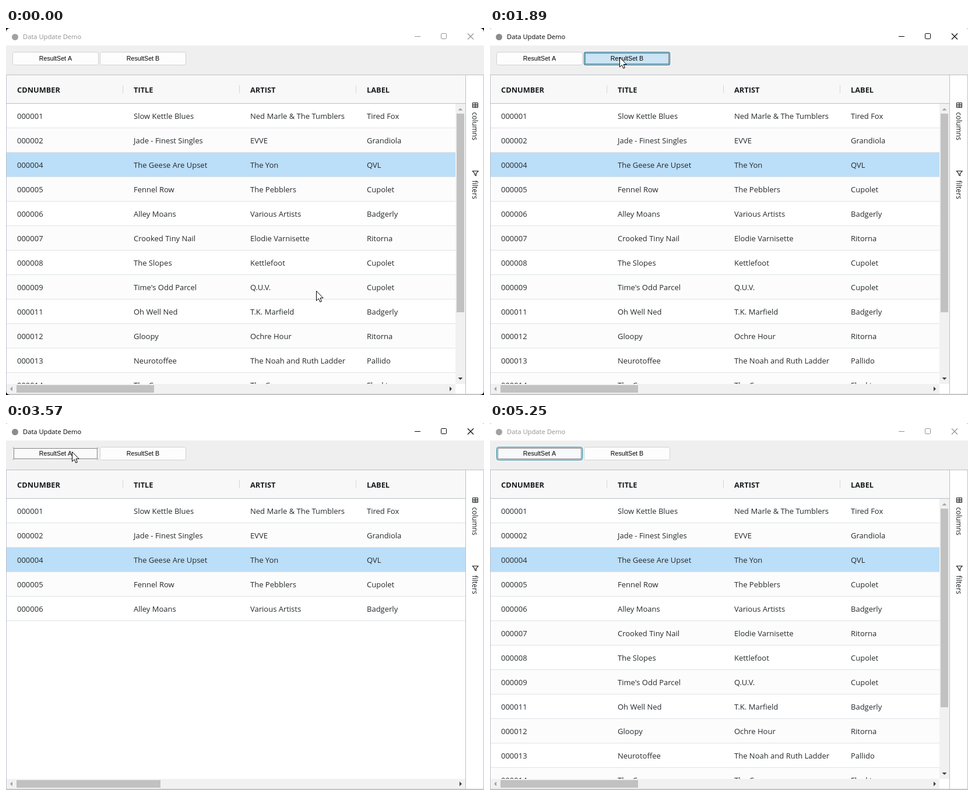
Write an HTML page with a canvas that moves like this. It is 820x630 px and loops after 5.33 s.

```html
<!DOCTYPE html>
<html lang="en">
<head>
<meta charset="utf-8">
<title>Data Update Demo</title>
<style>
  html, body { margin: 0; width: 100%; height: 100%; overflow: hidden; background: #fff; }
  canvas { display: block; }
</style>
</head>
<body>
<canvas id="stage" width="820" height="630"></canvas>
<script>
const ctx = document.getElementById('stage').getContext('2d');
const LOOP = 5330;
const UI = '"Open Sans", "Noto Sans", sans-serif';
const TEAL = '#0b7390', LINE = '#babfc7', INK = '#25292b';

const COLUMNS = ['CDNUMBER', 'TITLE', 'ARTIST', 'LABEL'];
const ROWS = [
  ['000001', 'Slow Kettle Blues', 'Ned Marle & The Tumblers', 'Tired Fox'],
  ['000002', 'Jade - Finest Singles', 'EVVE', 'Grandiola'],
  ['000004', 'The Geese Are Upset', 'The Yon', 'QVL'],
  ['000005', 'Fennel Row', 'The Pebblers', 'Cupolet'],
  ['000006', 'Alley Moans', 'Various Artists', 'Badgerly'],
  ['000007', 'Crooked Tiny Nail', 'Elodie Varnisette', 'Ritorna'],
  ['000008', 'The Slopes', 'Kettlefoot', 'Cupolet'],
  ['000009', "Time's Odd Parcel", 'Q.U.V.', 'Cupolet'],
  ['000011', 'Oh Well Ned', 'T.K. Marfield', 'Badgerly'],
  ['000012', 'Gloopy', 'Ochre Hour', 'Ritorna'],
  ['000013', 'Neurotoffee', 'The Noah and Ruth Ladder', 'Pallido'],
  ['000014', 'The Coves', 'The Coves', 'Flanktor']
];

const ARROW = new Path2D('M0 0v16.6l3.8-3.6 2.5 5.8 2.6-1.1-2.4-5.7h5.1z');
const HAND = new Path2D('M6 13V2.2a1.7 1.7 0 0 1 3.4 0V9q1.5-1.2 3 .3 1.5-.9 2.7.6 2-.3 2 1.8v5q0 3-2 5.5v1h-8v-1q-2.5-2.5-4.5-6.5-2-2.5-.8-3.2 1.8-.8 4.2 2.2z');

const ramp = (t, a, b) => Math.min(1, Math.max(0, (t - a) / (b - a)));
const within = (t, a, b) => t >= a && t < b;

function rect(x, y, w, h, color) {
  ctx.fillStyle = color;
  ctx.fillRect(x, y, w, h);
}

function text(str, x, y, font, color = INK, align = 'left') {
  ctx.font = font;
  ctx.fillStyle = color;
  ctx.textAlign = align;
  ctx.fillText(str, x, y);
}

function stroke(d, color, width = 1) {
  ctx.strokeStyle = color;
  ctx.lineWidth = width;
  ctx.stroke(new Path2D(d));
}

function fill(d, color) {
  ctx.fillStyle = color;
  ctx.fill(new Path2D(d));
}

function titleBar(active) {
  const color = active ? '#000' : '#929292';
  rect(0, 0, 820, 30, '#fff');
  ctx.beginPath();
  ctx.arc(15.5, 15.5, 5.5, 0, 7);
  ctx.fillStyle = active ? '#8c8c8c' : '#a2a2a2';
  ctx.fill();
  text('Data Update Demo', 29, 19, '11.2px ' + UI, color);
  stroke('M701 14.5h10M747.5 9.5h7q1 0 1 1v7q0 1-1 1h-7q-1 0-1-1v-7q0-1 1-1z', color);
  stroke('M792 9.5l10 10M802 9.5l-10 10', color, 1.1);
}

function button(x, label, { hot = 0, press = 0, blank = 0, focus = false }) {
  const layer = (inside, border, alpha) => {
    ctx.globalAlpha = alpha;
    ctx.beginPath();
    ctx.roundRect(x + .5, 41.5, 147, 22, 3);
    ctx.fillStyle = inside;
    ctx.fill();
    ctx.strokeStyle = border;
    ctx.lineWidth = 1;
    ctx.stroke();
    ctx.globalAlpha = 1;
  };
  layer(focus ? '#f6fafc' : '#fdfdfd', focus ? TEAL : '#d0d0d0', 1);
  layer('#dcecf8', TEAL, hot);
  layer('#cce4f4', '#0b6580', press);
  layer('#fafafa', '#efefef', blank);
  if (focus) {
    ctx.setLineDash([1, 1]);
    ctx.strokeStyle = '#000';
    ctx.strokeRect(x + 2.5, 43.5, 143, 18);
    ctx.setLineDash([]);
  }
  text(label, x + 74, 56, '10.67px "Liberation Sans", Arial, sans-serif', '#000', 'center');
}

function toolbar(t) {
  rect(0, 30, 820, 50, '#efefef');
  button(11, 'ResultSet A', {
    hot: t < 2950 ? 0 : ramp(t, 2950, 3200) * (1 - ramp(t, 4640, 4850)),
    press: within(t, 3330, 3570) ? ramp(t, 3300, 3400) : 0,
    blank: t < 3570 ? 0 : 1 - ramp(t, 3580, 3800),
    focus: t >= 3330
  });
  button(161, 'ResultSet B', {
    hot: t < 1260 ? 0 : ramp(t, 1050, 1400) * (1 - ramp(t, 2850, 3100)),
    press: within(t, 1820, 2050) ? ramp(t, 1790, 1890) : 0,
    blank: t < 2050 ? 0 : 1 - ramp(t, 2050, 2280),
    focus: within(t, 1820, 3330)
  });
}

function grid(t) {
  const short = within(t, 2110, 3640);
  const right = short ? 788 : 771;
  rect(0, 80, 820, 550, '#fff');
  rect(1, 81, 787, 48, '#f8f8f8');
  COLUMNS.forEach((name, i) => {
    text(name, 19 + 200 * i, 111, 'bold 12.8px ' + UI, '#181d1f');
    if (i) rect(200 * i, 98, 1, 14, '#d3d6da');
  });

  ctx.save();
  ctx.beginPath();
  ctx.rect(1, 130, right - 1, 481);
  ctx.clip();
  ROWS.slice(0, short ? 5 : 12).forEach((row, i) => {
    const y = 130 + 42 * i;
    const hover = i === 6 && within(t, 590, 1260);
    rect(1, y, 787, 42, i === 2 ? '#bbdef9' : hover ? '#e8f4fd' : i % 2 ? '#fcfcfc' : '#fff');
    rect(1, y + 41, 787, 1, '#dfe2e6');
    row.forEach((cell, c) => text(cell, 19 + 200 * c, y + 26, '13px ' + UI));
  });
  if (within(t, 590, 1820)) {
    ctx.strokeStyle = '#2196d3';
    ctx.lineWidth = 1;
    ctx.strokeRect(201.5, 214.5, 199, 40);
  }
  ctx.restore();

  if (!short) {
    rect(771, 130, 17, 481, '#f1f1f1');
    rect(773, 147, 13, 341, '#c1c1c1');
    fill('M775.5 141.5h8l-4-4z', '#a3a3a3');
    fill('M775.5 600h8l-4 4z', '#404040');
  }
  rect(1, 611, right - 1, 17, '#f1f1f1');
  rect(18, 613, short ? 247 : 236, 13, '#c1c1c1');
  fill('M11 615.5v8l-4-4z', '#a3a3a3');
  fill(`M${right - 10} 615.5v8l4-4z`, '#404040');

  rect(0, 80, 820, 1, LINE);
  rect(1, 129, 788, 1, LINE);
  rect(0, 80, 1, 550, LINE);
  rect(788, 80, 1, 549, LINE);
  rect(819, 80, 1, 550, LINE);
  rect(0, 628, 820, 2, '#c2c4c7');
}

function sideBar() {
  stroke('M800.5 128.5h9v8h-9zM800 131.5h10M800 134h10M805 129v8', '#181d1f');
  stroke('M800.5 245.5h9.5l-3.6 4.5v3.5l-2.4-1.5v-2z', '#181d1f', 1.2);
  [['columns', 144.5], ['filters', 261.5]].forEach(([label, y]) => {
    ctx.save();
    ctx.translate(800, y);
    ctx.rotate(Math.PI / 2);
    text(label, 0, 0, '12.2px ' + UI, '#181d1f');
    ctx.restore();
  });
}

function pointer(t) {
  if (t >= 4770) return;
  const hand = within(t, 4610, 4700);
  let k = ramp(t, 2740, 3260);
  k = k * k * (3 - 2 * k);
  const [x, y] =
    t < 100 ? [532, 451] :
    t < 590 ? [529, 434] :
    t < 1260 ? [525, 414] :
    t < 1330 ? [223, 52] :
    t < 4610 ? [222 - 109 * k, 50 - k] :
    hand ? [115, 85] : [664, 612];
  ctx.save();
  ctx.translate(x + .5, y + .5);
  const shape = hand ? HAND : ARROW;
  ctx.fillStyle = '#fff';
  ctx.fill(shape);
  ctx.strokeStyle = '#000';
  ctx.lineWidth = 1;
  ctx.lineJoin = 'round';
  ctx.stroke(shape);
  if (hand) stroke('M9.4 9v4M12.4 9.5v3.5M15 10.2v3', '#000');
  ctx.restore();
}

function corners(color, radius) {
  ctx.beginPath();
  ctx.rect(0, 0, 820, 630);
  ctx.roundRect(0, 0, 820, 630, radius);
  ctx.fillStyle = color;
  ctx.fill('evenodd');
}

function draw(now) {
  const t = now % LOOP;
  titleBar(within(t, 590, 5170));
  toolbar(t);
  grid(t);
  sideBar();
  pointer(t);
  if (t < 590) corners('#000', 7);
  else corners('#c4c4c4', 4);
}

const start = performance.now();
function tick() {
  draw(performance.now() - start);
  requestAnimationFrame(tick);
}
tick();
</script>
</body>
</html>
```
